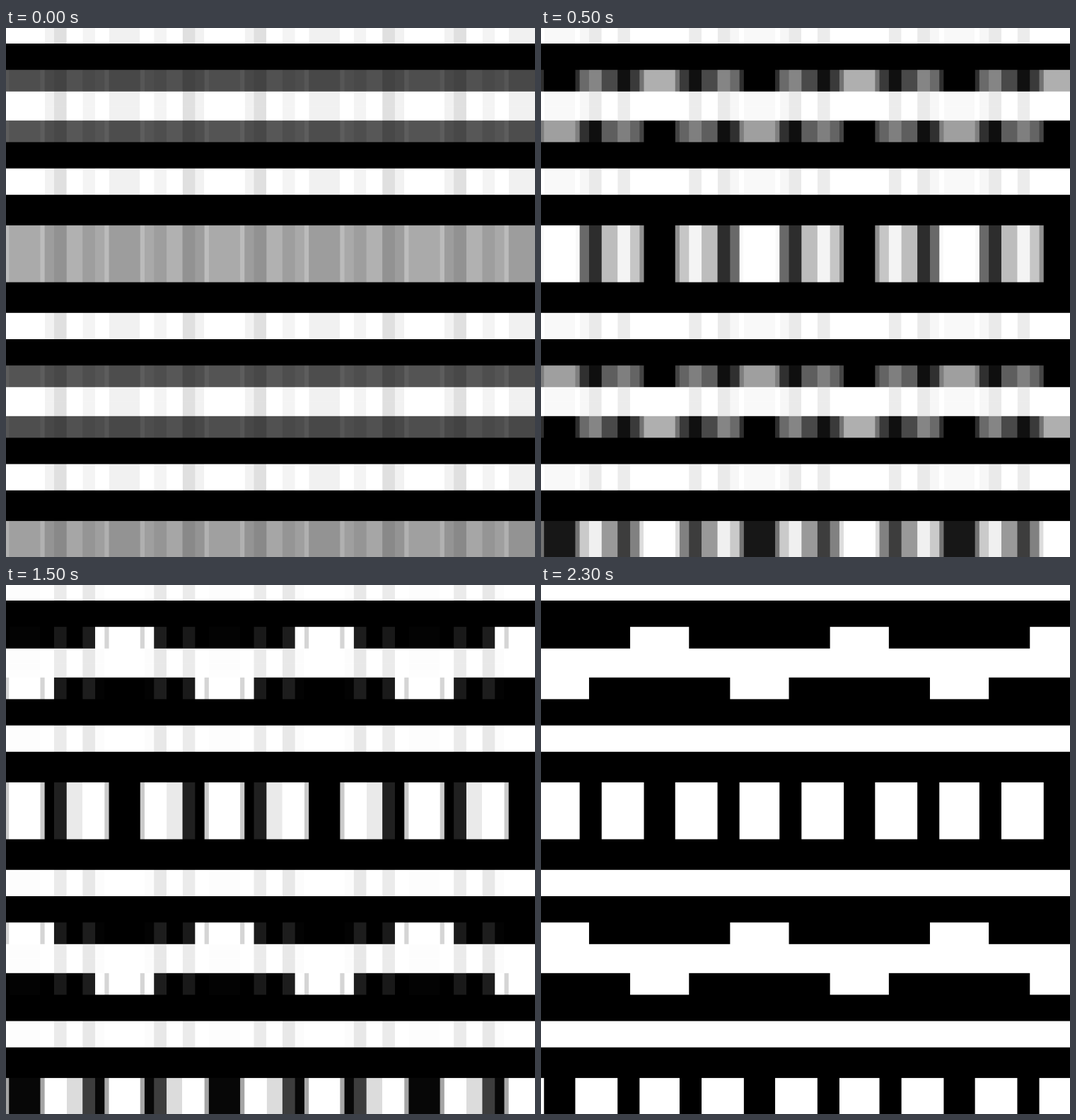
These frames come from a looping animation (748x748 px, 2.5 s). An HTML page with a canvas:

```html
<!DOCTYPE html>
<html>
<head>
<meta charset="utf-8">
<title>Low-rank approximation</title>
<style>
html, body { margin: 0; height: 100%; overflow: hidden; background: #000; }
canvas { display: block; }
</style>
</head>
<body>
<canvas width="748" height="748"></canvas>
<script>
// A woven pattern rebuilt from its 1, 2, ... 5 strongest singular components.
const SIZE = 748, RANKS = 5, STEP = 500;
const HALF = 141.3, CENTRE_X = 167.65;   // half the horizontal period, centre of a motif
const PITCH = 418, CENTRE_Y = 319.3;     // vertical distance between motif rows
const ctx = document.querySelector('canvas').getContext('2d');

const clamp = (v, low, high) => Math.min(high, Math.max(low, v));
const past = (d, edge) => clamp(d - edge + 0.5, 0, 1);   // smooth step one pixel wide
const dot = (a, b) => a.reduce((sum, v, i) => sum + v * b[i], 0);
const unit = a => {
  const length = Math.sqrt(dot(a, a));
  return a.map(v => v / length);
};
const perColumn = f => Array.from({ length: SIZE }, (_, x) => f(x));

// Brightness as a function of the distance to the nearest motif centre
const plain = () => 1;
const wave = d => past(d, 99.7);
const blocks = d => past(d, 22.1) - past(d, 81.9) + past(d, 113);

// Motif rows alternate sideways by half a period
const distance = (x, shift) => {
  const turn = (x + 0.5 - CENTRE_X) / (2 * HALF) + shift / 2;
  return Math.abs(turn - Math.round(turn)) * 2 * HALF;
};
const kinds = [[plain, 0], [wave, 0], [blocks, 0], [wave, 1], [blocks, 1]];

// Each motif row is mirrored about its centre line
const bands = [];
function addBand(kind, top, bottom) {
  top = clamp(top, 0, SIZE);
  bottom = clamp(bottom, 0, SIZE);
  if (bottom > top) bands.push({ kind, top, height: bottom - top });
}
for (let n = -1; n <= 1; n++) {
  const y = CENTRE_Y + n * PITCH, first = n ? 3 : 1;
  const mirrored = (kind, from, to) => {
    addBand(kind, y - to, y - from);
    addBand(kind, y + from, y + to);
  };
  addBand(first + 1, y - 40.2, y + 40.2);
  mirrored(0, 83.5, 120.7);
  mirrored(first, 157.9, 188.5);
  mirrored(0, 188.5, PITCH / 2);
}

// One row per kind, weighted by how many pixel rows share it
const weights = kinds.map((_, k) =>
  Math.sqrt(bands.reduce((sum, b) => sum + (b.kind === k ? b.height : 0), 0)));
const rows = kinds.map(([shape, shift], k) =>
  perColumn(x => weights[k] * shape(distance(x, shift))));

// Left singular vectors by power iteration with deflation
const gram = rows.map(a => rows.map(b => dot(a, b)));
const vectors = [];
for (let n = 0; n < RANKS; n++) {
  let u = kinds.map((_, k) => 1 / (k + 1));
  for (let i = 0; i < 3000; i++) {
    u = gram.map(g => dot(g, u));
    for (const v of vectors) {
      const d = dot(u, v);
      u = u.map((c, j) => c - d * v[j]);
    }
    u = unit(u);
  }
  vectors.push(u);
}
const components = vectors.map(u =>
  perColumn(x => u.reduce((sum, c, k) => sum + c * rows[k][x], 0)));

function draw(rank) {
  ctx.clearRect(0, 0, SIZE, SIZE);
  ctx.globalCompositeOperation = 'lighter';   // adjoining soft edges add up
  for (const { kind, top, height } of bands) {
    for (let x = 0; x < SIZE; x++) {
      let value = 0;
      for (let n = 0; n < rank; n++) value += vectors[n][kind] * components[n][x];
      const level = Math.round(255 * clamp(value / weights[kind], 0, 1));
      ctx.fillStyle = `rgb(${level},${level},${level})`;
      ctx.fillRect(x, top, 1, height);
    }
  }
}

const start = performance.now();
let shown = 0;
function tick() {
  const rank = 1 + Math.floor((performance.now() - start) / STEP) % RANKS;
  if (rank !== shown) draw(shown = rank);
  requestAnimationFrame(tick);
}
tick();
</script>
</body>
</html>
```
